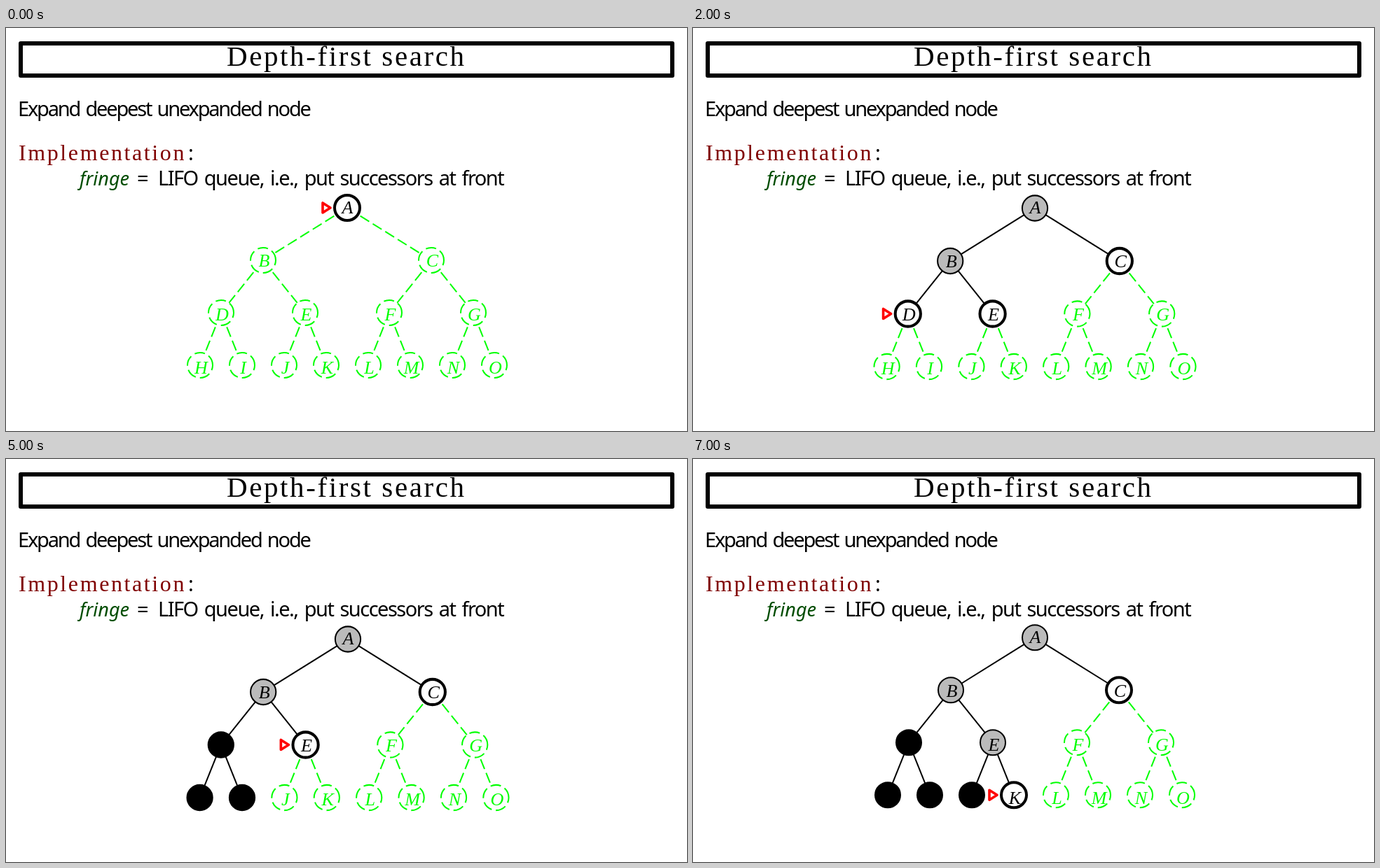
Write an HTML page with a canvas that moves like this. It is 972 by 576 pixels and loops after 8 s.

```html
<!DOCTYPE html>
<html lang="en">
<head>
<meta charset="utf-8">
<title>Depth-first search</title>
<style>
  html, body { margin: 0; width: 100%; height: 100%; overflow: hidden; background: #fff; }
  canvas { display: block; }
</style>
</head>
<body>
<canvas id="stage" width="972" height="576"></canvas>
<script>
const ctx = document.getElementById('stage').getContext('2d');
const SERIF = '"Liberation Serif", serif';
const SANS = '"Noto Sans", sans-serif';
const GREEN = '#00ff00';
const STEP_MS = 1000;

// Tree placement: root x, root y, leaf gap, level gap, label drop per level
const WIDE = [488, 257.5, 60.4, 75.5, 1.1];
const MID = [488, 257, 60, 75, 1.5];
const HIGH = [488, 255.3, 60, 75, 1.8];

// Node states in level order: f fringe, e expanded, d done, anything else unseen
const STEPS = [
  { at: 'A', nodes: 'f', layout: [487, 257, 60, 75, 1.5] },
  { at: 'B', nodes: 'eff', layout: MID },
  { at: 'D', nodes: 'eefff', layout: WIDE },
  { at: 'H', nodes: 'eefef..ff', layout: [494.5, 256.3, 58.15, 72.7, 1.1] },
  { at: 'I', nodes: 'eefef..df', layout: MID },
  { at: 'E', nodes: 'eefdf..dd', layout: WIDE },
  { at: 'J', nodes: 'eefde..ddff', layout: HIGH },
  { at: 'K', nodes: 'eefde..dddf', layout: HIGH }
];

function text(str, x, y, font, color = '#000', letter = 0, word = 0) {
  ctx.font = font;
  ctx.fillStyle = color;
  ctx.letterSpacing = letter + 'px';
  ctx.wordSpacing = word + 'px';
  ctx.fillText(str, x, y);
}

function drawHeading() {
  ctx.textAlign = 'left';
  ctx.strokeStyle = '#000';
  ctx.lineWidth = 6;
  ctx.lineJoin = 'round';
  ctx.strokeRect(21, 22, 930, 46);
  text('Depth-first search', 315, 53.5, '41px ' + SERIF, '#000', 2.6);
  text('Expand deepest unexpanded node', 17, 125.5, '29px ' + SANS, '#000', -2.2, 3);
  text('Implementation', 18, 189, '32px ' + SERIF, '#800000', 2.6);
  text(':', 260, 189, '29px ' + SANS);
  text('fringe', 105, 224.5, 'italic 27px ' + SANS, '#004c00');
  text('=', 187, 225, '29px ' + SANS);
  text('LIFO queue, i.e., put successors at front', 217, 225, '29px ' + SANS, '#000', -1.5, 3);
}

function place(i, [rootX, rootY, leaf, rise]) {
  const level = Math.floor(Math.log2(i + 1));
  const index = i + 1 - 2 ** level;
  const gap = leaf * 8 / 2 ** level;
  return { level, x: rootX + (index - (2 ** level - 1) / 2) * gap, y: rootY + level * rise };
}

function setStroke(color, width, dashed, scale) {
  ctx.strokeStyle = color;
  ctx.lineWidth = width * scale;
  ctx.setLineDash(dashed ? [15 * scale, 6 * scale] : []);
}

function drawEdge(from, to, seen, scale) {
  const length = Math.hypot(to.x - from.x, to.y - from.y);
  const ux = (to.x - from.x) / length, uy = (to.y - from.y) / length;
  const start = (seen ? 18 : 22) * scale, end = length - 18 * scale;
  setStroke(seen ? '#000' : GREEN, 2, !seen, scale);
  ctx.beginPath();
  ctx.moveTo(from.x + ux * start, from.y + uy * start);
  ctx.lineTo(from.x + ux * end, from.y + uy * end);
  ctx.stroke();
}

function drawNode(node, letter, state, drop, scale) {
  const seen = 'fed'.includes(state);
  ctx.beginPath();
  ctx.arc(node.x, node.y, 18 * scale, 0, -Math.PI * 2, true);
  ctx.fillStyle = { e: '#bbb', d: '#000' }[state] || '#fff';
  ctx.fill();
  setStroke(seen ? '#000' : GREEN, state === 'f' ? 4 : 2, !seen, scale);
  ctx.stroke();
  if (state === 'd') return;
  ctx.textAlign = 'center';
  const shift = node.level ? 1.5 : 0.5;
  text(letter, node.x + shift, node.y + 7.6 * scale + node.level * drop,
    `italic ${26 * scale}px ${SERIF}`, seen ? '#000' : GREEN);
}

function drawPointer({ x, y }, scale) {
  setStroke('#f00', 3.6, false, scale);
  ctx.beginPath();
  ctx.moveTo(x - 35 * scale, y - 7 * scale);
  ctx.lineTo(x - 35 * scale, y + 7 * scale);
  ctx.lineTo(x - 24 * scale, y);
  ctx.closePath();
  ctx.stroke();
}

function drawTree({ at, nodes, layout }) {
  const scale = layout[2] / 60;
  const states = [...nodes.padEnd(15, '.')];
  const spots = states.map((_, i) => place(i, layout));
  for (let i = 1; i < 15; i++) {
    drawEdge(spots[(i - 1) >> 1], spots[i], states[i] !== '.', scale);
  }
  states.forEach((state, i) => {
    drawNode(spots[i], String.fromCharCode(65 + i), state, layout[4], scale);
  });
  drawPointer(spots[at.charCodeAt(0) - 65], scale);
}

function render(now) {
  const step = Math.floor(now / STEP_MS) % STEPS.length;
  ctx.setLineDash([]);
  ctx.fillStyle = '#fff';
  ctx.fillRect(0, 0, 972, 576);
  drawHeading();
  drawTree(STEPS[step]);
}

const begin = performance.now();
function tick() {
  render(performance.now() - begin);
  requestAnimationFrame(tick);
}
tick();
</script>
</body>
</html>
```
